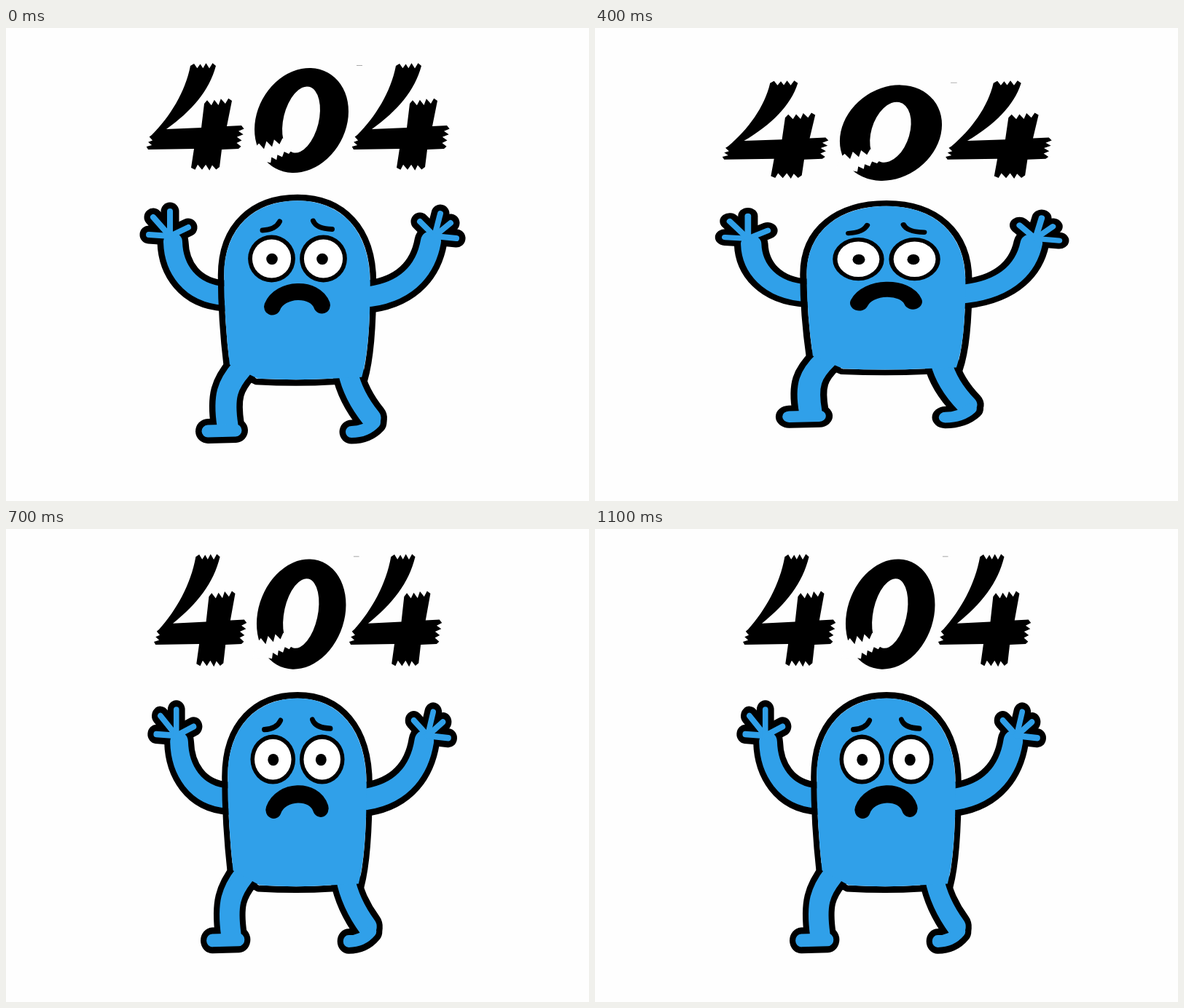
Animation of 800 by 650 pixels, one loop 1.2 s. Source, as an HTML page with a canvas:

```html
<!DOCTYPE html>
<html lang="en">
<head>
<meta charset="utf-8">
<title>404</title>
<style>
  html, body { margin: 0; width: 100%; height: 100%; overflow: hidden; background: #fefefe; }
  canvas { display: block; width: 800px; height: 650px; }
</style>
</head>
<body>
<canvas id="stage" width="800" height="650"></canvas>
<script>
const ctx = document.getElementById('stage').getContext('2d');
const W = 800, H = 650;
const LOOP = 1200, STEP = 100, SQUASH = 0.1;
const PAPER = '#fefefe', INK = '#000', BLUE = '#30a0e9';
const LINE = 8.5;

const noise = n => Math.abs(Math.sin(n * 12.9898) * 43758.5453) % 1;

// Zigzag edge between two points.
function tear(path, x0, y0, x1, y1, teeth, depth) {
  const len = Math.hypot(x1 - x0, y1 - y0);
  const nx = (y1 - y0) / len, ny = (x0 - x1) / len;
  const steps = teeth * 2;
  path.lineTo(x0, y0);
  for (let i = 1; i < steps; i++) {
    const k = (i + 0.3 * (noise(i + x0) - 0.5)) / steps;
    const d = (i % 2 ? 0.5 : -0.5) * depth * (0.6 + 0.4 * noise(i + y0));
    path.lineTo(x0 + (x1 - x0) * k + nx * d, y0 + (y1 - y0) * k + ny * d);
  }
  path.lineTo(x1, y1);
}

function makeFour() {
  const p = new Path2D();
  p.moveTo(253, 52);
  tear(p, 253, 52, 288, 52, 4, 8);
  p.bezierCurveTo(279, 86, 255, 114, 220, 139);
  p.lineTo(268, 137);
  tear(p, 272, 104, 310, 100, 4, 9);
  p.lineTo(303, 135);
  tear(p, 323, 134, 319, 166, 4, 9);
  p.lineTo(296, 167);
  tear(p, 293, 191, 254, 192, 4, 9);
  p.lineTo(258, 166);
  tear(p, 195, 167, 200, 147, 3, 8);
  p.bezierCurveTo(225, 122, 246, 88, 253, 52);
  return p;
}

function makeZero() {
  const p = new Path2D();
  p.ellipse(405.5, 127, 61, 75, 0.5, 0, Math.PI * 2);
  p.closePath();
  p.moveTo(405, 126);
  const hole = new Path2D();
  hole.ellipse(405, 126, 24.2, 46.5, 0.24, 0, Math.PI * 2);
  p.addPath(hole);
  return p;
}

function makeGap() {
  const p = new Path2D();
  p.moveTo(335, 185);
  tear(p, 342, 164, 386, 154, 4, 11);
  tear(p, 391, 169, 357, 184, 4, 8);
  p.closePath();
  return p;
}

const four = makeFour(), zero = makeZero(), gap = makeGap();

const body = new Path2D(`M303 466Q295 400 295 340C295 270 340 233 400 233
  C462 233 504 275 504 350C504 420 499 460 492 484L449 486Q400 489 343 486Z`);

// A limb is a path with the width of its coloured core.
const limb = (d, width) => ({ path: new Path2D(d), width });

function hand(x, y, tips) {
  return tips.map(([tx, ty]) => limb(`M${x} ${y}L${tx} ${ty}`, 8));
}

const leftArm = [
  limb('M229 294C230 330 252 365 300 368', 26),
  ...hand(225, 286, [[196, 284], [202, 260], [225, 252], [250, 274]])
];
const rightSide = [
  limb('M583 293C577 327 555 361 500 369', 28),
  ...hand(588, 286, [[568, 266], [596, 255], [610, 268], [618, 289]])
];
const legs = [
  limb('M323 468C304 490 298 506 304 546', 29),
  limb('M277 554L315 553', 17),
  limb('M469 472Q476 505 501 536', 27),
  limb('M474 555Q494 555 506 542', 16)
];

// All ink goes down before any colour, so overlapping parts share one outline.
function drawParts(limbs, torso) {
  for (const [color, extra] of [[INK, LINE], [BLUE, 0]]) {
    ctx.strokeStyle = ctx.fillStyle = color;
    for (const { path, width } of limbs) {
      ctx.lineWidth = width + extra * 2;
      ctx.stroke(path);
    }
    if (!torso) continue;
    if (color === INK) {
      ctx.lineWidth = LINE;
      ctx.stroke(torso);
    } else {
      ctx.save();
      ctx.globalCompositeOperation = 'source-over';
      ctx.fill(insetBody);
      ctx.restore();
    }
  }
}

// The torso scaled about its middle, leaving its outline free.
const insetBody = new Path2D();
insetBody.addPath(body, new DOMMatrix()
  .translate(399.5, 360).scale(1 - LINE / 209, 1 - LINE / 254).translate(-399.5, -360));

function dot(x, y, r, color) {
  ctx.fillStyle = color;
  ctx.beginPath();
  ctx.arc(x, y, r, 0, Math.PI * 2);
  ctx.fill();
}

function drawEye(x, pupil) {
  dot(x, 317, 32.4, INK);
  dot(x, 317, 26.6, '#fff');
  dot(pupil, 317.5, 7.8, INK);
}

function inkLine(d, width) {
  ctx.strokeStyle = INK;
  ctx.lineWidth = width;
  ctx.stroke(new Path2D(d));
}

function drawNumber() {
  ctx.fillStyle = INK;
  ctx.fill(four);
  ctx.fill(zero, 'evenodd');
  ctx.save();
  ctx.translate(282, 0);
  ctx.fill(four);
  ctx.restore();
  ctx.fillStyle = PAPER;
  ctx.fill(gap);
  ctx.fillStyle = '#aaa';
  ctx.fillRect(481, 51, 8, 1);
}

function drawMonster() {
  ctx.lineJoin = ctx.lineCap = 'round';
  drawParts(leftArm);
  drawParts([...rightSide, ...legs], body);
  inkLine('M352 278Q370 277 375.5 266', 7);
  inkLine('M421.5 265Q426 276 447.5 276.5', 7);
  drawEye(364.5, 365);
  drawEye(435.5, 434);
  inkLine('M365.5 383C376 357 424 355 433.5 381', 23);
}

function draw(now) {
  const t = Math.floor((now % LOOP) / STEP) * STEP;
  const s = SQUASH * Math.sin(t / LOOP * Math.PI * 2);
  ctx.setTransform(1, 0, 0, 1, 0, 0);
  ctx.fillStyle = PAPER;
  ctx.fillRect(0, 0, W, H);
  ctx.translate(W / 2, H / 2);
  ctx.scale(1 + s, 1 - s);
  ctx.translate(-W / 2, -H / 2);
  drawNumber();
  drawMonster();
}

const start = performance.now();
function tick() {
  draw(performance.now() - start);
  requestAnimationFrame(tick);
}
tick();
</script>
</body>
</html>
```
